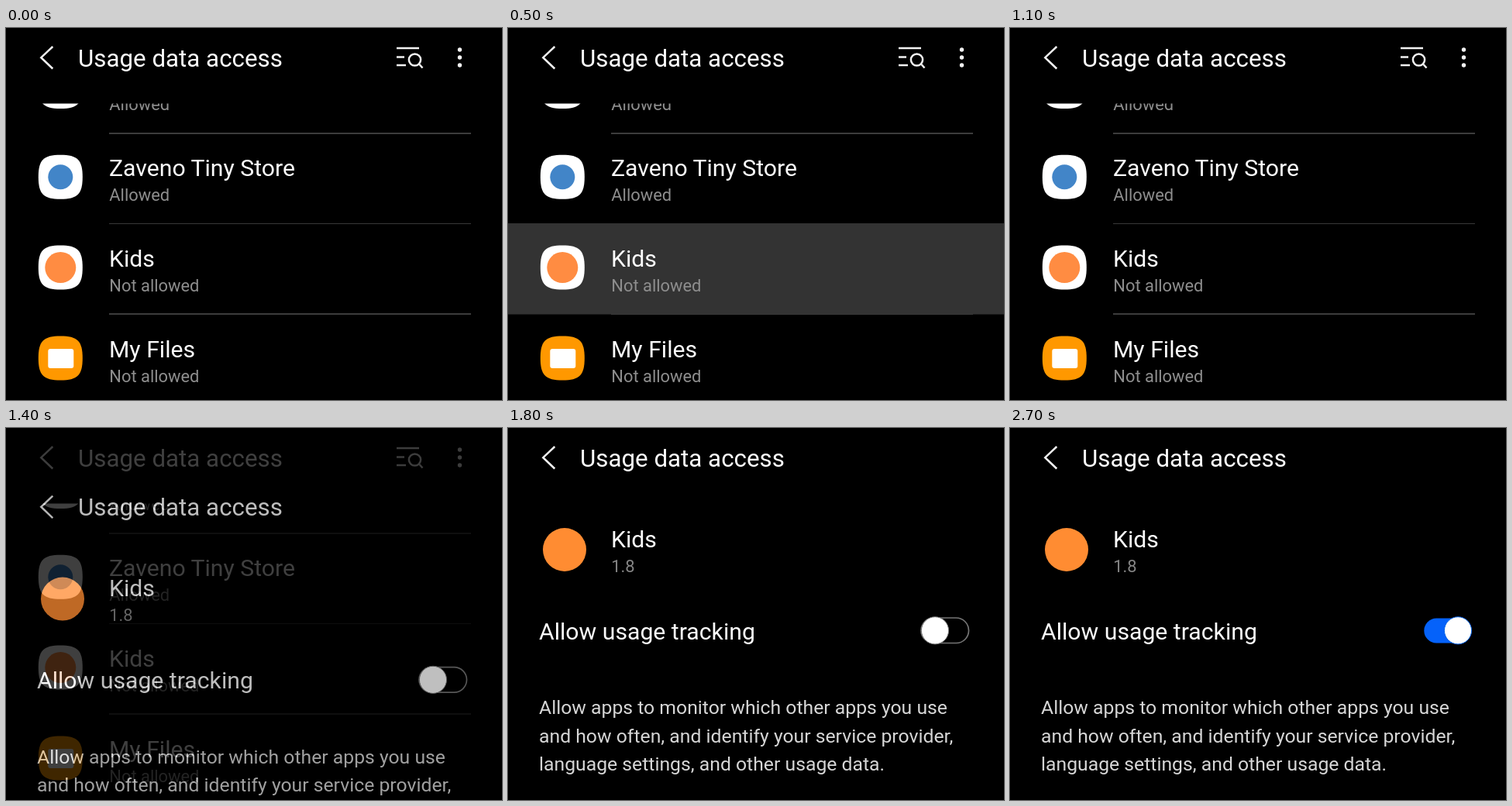
Recreate the animation shown at these times as an HTML page. Size 640 by 480 pixels, loop 2900 ms.

```html
<!DOCTYPE html>
<html lang="en">
<head>
<meta charset="utf-8">
<title>Usage data access</title>
<style>
  html, body { margin: 0; width: 100%; height: 100%; overflow: hidden; background: #000; }
  svg { display: block; width: 100vw; height: 100vh; }
  text { font-family: Roboto, sans-serif; fill: #fcfcfc; }
  .title { font-size: 31.3px; }
  .label { font-size: 30.2px; }
  .sub { font-size: 21.9px; fill: #8e8e8e; }
  .version { font-size: 21.9px; fill: #848484; }
  .note { font-size: 24.75px; fill: #d6d6d6; }
  .line { fill: none; stroke: #f2f2f2; stroke-width: 2.5; }
</style>
</head>
<body>
<svg viewBox="0 0 640 480">
  <defs>
    <path id="tile" d="M0-28.5C22-28.5 28.5-22 28.5 0S22 28.5 0 28.5-28.5 22-28.5 0-22-28.5 0-28.5Z"/>
    <g id="header">
      <path class="line" d="M60.3 24 45.3 38.2 60.3 52.5"/>
      <text class="title" x="93" y="49.5">Usage data access</text>
    </g>
    <clipPath id="listClip"><rect y="97.5" width="640" height="383"/></clipPath>
    <clipPath id="rowClip"><rect y="252" width="640" height="117.5"/></clipPath>
  </defs>

  <g id="list">
    <use href="#header"/>
    <path class="line" d="M504 26H533M504 37.5H514M504 48H516M533.5 47 537.5 51.5"/>
    <circle class="line" cx="527.5" cy="41" r="7.6"/>
    <g fill="#f2f2f2">
      <circle cx="585.5" cy="28" r="2.7"/>
      <circle cx="585.5" cy="38" r="2.7"/>
      <circle cx="585.5" cy="48" r="2.7"/>
    </g>
    <path d="M133 136H600M133 369H600" stroke="#505050" stroke-width="1.4"/>
    <path d="M133 252.5H600" stroke="#383838"/>
    <g clip-path="url(#rowClip)">
      <circle id="ripple" cx="378" cy="310" fill="#333"/>
    </g>
    <g id="rows" clip-path="url(#listClip)"></g>
  </g>

  <g id="detail">
    <rect width="640" height="480"/>
    <g id="page">
      <use href="#header"/>
      <circle cx="73" cy="157" r="28" fill="#ff8c32"/>
      <text class="label" x="133" y="153.5">Kids</text>
      <text class="version" x="133.3" y="185.7">1.8</text>
      <text class="label" x="40" y="272.5">Allow usage tracking</text>
      <rect id="outline" x="533" y="245" width="61.5" height="32.5" rx="16.25" fill="none" stroke="#747474" stroke-width="1.7"/>
      <rect id="track" x="534.3" y="245.5" width="61" height="32" rx="16" fill="#0562fa"/>
      <circle id="halo" cy="261.3" r="37" fill="#8a8a8a"/>
      <circle id="thumb" cy="261.3" r="17.6" fill="#fff"/>
      <text class="note" x="40" y="369">Allow apps to monitor which other apps you use</text>
      <text class="note" x="40" y="405.5">and how often, and identify your service provider,</text>
      <text class="note" x="40" y="442">language settings, and other usage data.</text>
    </g>
  </g>
</svg>
<script>
const LOOP = 2900, STEP = 100, ROW = 116.8;
const $ = id => document.getElementById(id);
const set = (id, attrs) => {
  for (const k in attrs) $(id).setAttribute(k, attrs[k]);
};
const ramp = (t, from, to) => Math.min(1, Math.max(0, (t - from) / (to - from)));
const smooth = p => p * p * (3 - 2 * p);

const dot = (r, color) => `<circle r="${r}" fill="${color}"/>`;
const apps = [
  { name: "", state: "Allowed", tile: "#fff", icon: "" },
  { name: "Zaveno Tiny Store", state: "Allowed", tile: "#fff", icon: dot(16, "#4285c8") },
  { name: "Kids", state: "Not allowed", tile: "#fff", icon: dot(20, "#ff8c42") },
  { name: "My Files", state: "Not allowed", tile: "#ff9800",
    icon: '<rect x="-16" y="-12" width="33" height="25" rx="3" fill="#fff"/>' }
];

$("rows").innerHTML = apps.map((app, i) => {
  const y = 75.5 + i * ROW;
  return `<g transform="translate(70.3 ${y})"><use href="#tile" fill="${app.tile}"/>${app.icon}</g>
    <text class="label" x="133" y="${y - 1.4}">${app.name}</text>
    <text class="sub" x="133.3" y="${y + 30.8}">${app.state}</text>`;
}).join("");

function draw(time) {
  const t = Math.floor((time % LOOP) / STEP) * STEP;

  // Touch feedback spreads across the row
  const pressed = t >= 300 && t < 1100;
  set("ripple", { r: pressed ? 241 + Math.min(t - 300, 200) : 0 });

  // Detail page fades in while rising
  const rise = 1 - ramp(t, 1250, 1850);
  const y = t >= 1800 ? 0 : 113 * rise * rise;
  set("detail", { opacity: ramp(t, 1250, 1450) });
  set("page", { transform: `translate(0 ${y.toFixed(2)})` });

  // Switch turns on
  const on = smooth(ramp(t, 2250, 2650));
  const x = 551 + 27 * on;
  set("thumb", { cx: x, stroke: `hsl(215 ${100 * on}% 45%)` });
  set("halo", { cx: x, opacity: 0.2 * Math.sin(Math.PI * ramp(t, 2250, 2700)) });
  set("track", { opacity: on });
  set("outline", { opacity: 1 - on });
}

const start = performance.now();
function tick() {
  draw(performance.now() - start);
  requestAnimationFrame(tick);
}
tick();
</script>
</body>
</html>
```
